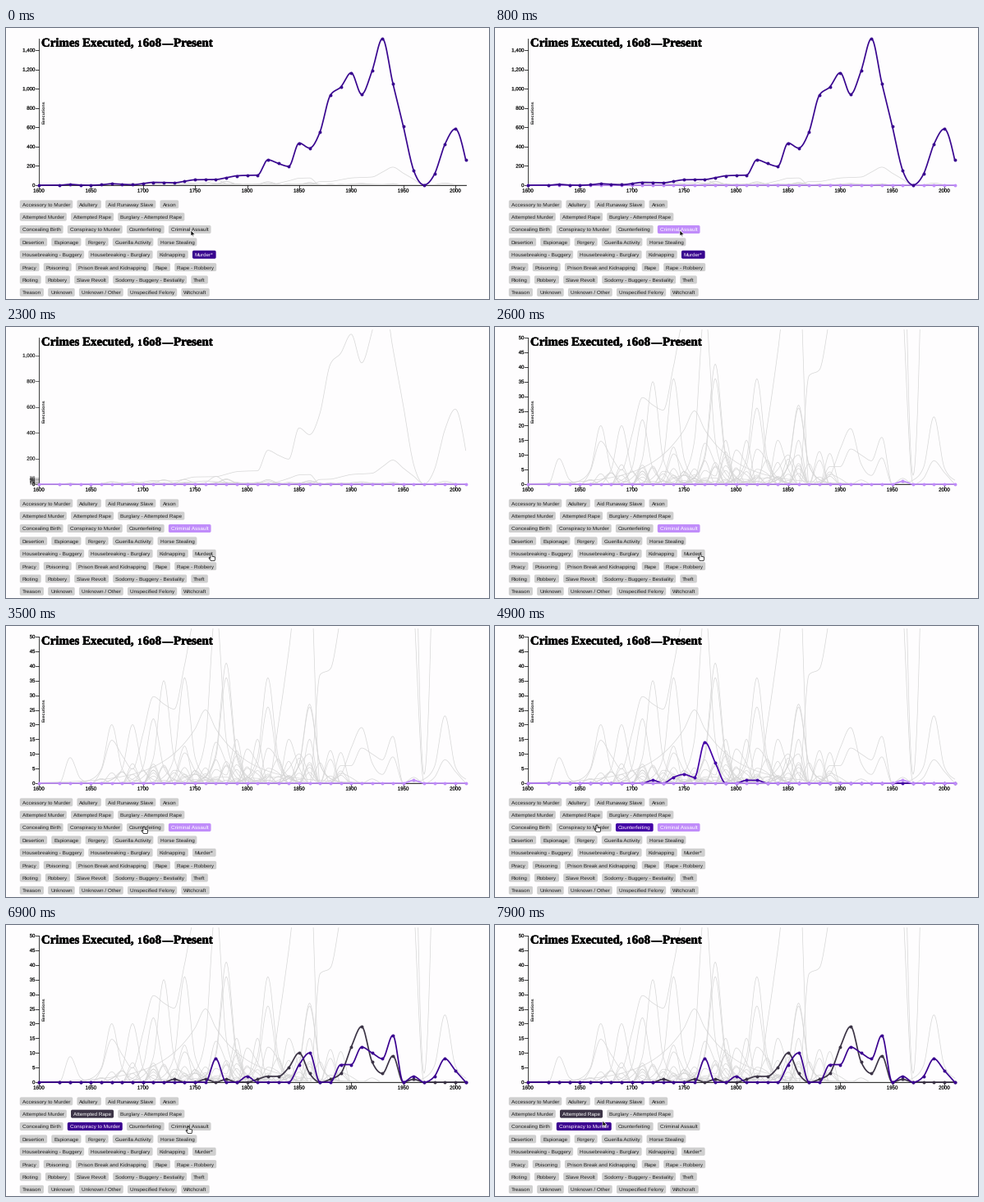
These frames come from a looping animation (588x331 px, 8000 ms). A matplotlib script:

```python
import numpy as np
import matplotlib.pyplot as plt
from matplotlib.animation import FuncAnimation
from matplotlib.patches import FancyBboxPatch, Polygon, Rectangle
from matplotlib.patheffects import withStroke

W, H, DPI = 588, 331, 64
FRAMES, STEP = 80, 100
X0, X1, TOP, BASE = 39.5, 559.7, 13, 192
PX_YEAR = 1.2675
BIG, SMALL = 1519, 50
GREY, INK, FILL = "#d6d6d6", "#1c1c1c", "#cfcfcf"

plt.rcParams["text.hinting"] = "none"
plt.rcParams["font.family"] = "Liberation Sans"


def pt(px):
    return px * 72 / DPI


fig = plt.figure(figsize=(W / DPI, H / DPI), dpi=DPI, facecolor="#fefdfe")
ax = fig.add_axes([0, 0, 1, 1])
ax.set_xlim(0, W)
ax.set_ylim(H, 0)
ax.axis("off")
clip = Rectangle((0, 3), W, H, transform=ax.transData)


def label(x, y, s, size, ha="center", heavy=0, color=INK, **kw):
    """Text on a baseline, thickened by a stroke of heavy pixels."""
    if heavy:
        kw["path_effects"] = [withStroke(linewidth=pt(heavy),
                                         foreground=color)]
    kw.setdefault("va", "baseline")
    return ax.text(x, y, s, fontsize=pt(size), ha=ha, color=color, **kw)


def rule(xs, ys):
    return ax.plot(xs, ys, color="#111111", lw=pt(0.8), zorder=3)[0]


def year_x(year):
    return 40 + (year - 1600) * PX_YEAR


# ---- data -------------------------------------------------------------

YEARS = np.array([1600] + list(range(1620, 2011, 10)))
KNOT_X = year_x(YEARS)
rng = np.random.default_rng(7)


def run(start, *values):
    """Values decade by decade from start, zero elsewhere."""
    ends = [start - 10, *range(start, start + 10 * len(values) + 1, 10)]
    return np.interp(YEARS, ends, [0, *values, 0])


def bump(year, height, fall=1.4):
    return height * np.exp(-fall * abs(YEARS - year) / 10)


def murder():
    early = 102 * ((YEARS - 1600) / 200) ** 2.6
    early += 8 * np.sin(2 * np.pi * (YEARS - 1620) / 40)
    late = run(1820, 263, 225, 195, 437, 385, 552, 933, 1018, 1165, 942,
               1184, 1519, 1056, 612, 153, 3, 115, 424, 583, 262)
    return np.where(YEARS < 1820, np.clip(early, 0, 104), late)


def minor():
    """A rare offence: a few low bumps, densest around 1790."""
    y = np.zeros(len(YEARS))
    for year in rng.normal(1795, 65, rng.integers(4, 8)):
        y[np.argmin(abs(YEARS - year))] = min(1 + rng.exponential(3.8), 15)
    return y


def monotone(x, y, n=12):
    """Monotone cubic curve through the points."""
    h = np.diff(x)
    s = np.diff(y) / h
    p = (s[:-1] * h[1:] + s[1:] * h[:-1]) / (h[:-1] + h[1:])
    m = np.zeros_like(y)
    m[1:-1] = (np.sign(s[:-1]) + np.sign(s[1:])) * np.minimum(
        np.minimum(abs(s[:-1]), abs(s[1:])), 0.5 * abs(p))
    m[0] = (3 * s[0] - m[1]) / 2
    m[-1] = (3 * s[-1] - m[-2]) / 2
    u = np.linspace(0, 1, n, endpoint=False)
    a, b = y[:-1, None], y[1:, None]
    ma, mb = (m[:-1] * h)[:, None], (m[1:] * h)[:, None]
    cy = ((2 * u**3 - 3 * u**2 + 1) * a + (u**3 - 2 * u**2 + u) * ma
          + (3 * u**2 - 2 * u**3) * b + (u**3 - u**2) * mb)
    cx = x[:-1, None] + u * h[:, None]
    return np.append(cx, x[-1]), np.append(cy, y[-1])


class Curve:
    def __init__(self, values, color=GREY, order=0):
        self.values, self.color, self.order = values, color, order
        self.x, self.y = monotone(KNOT_X, values)
        self.line, = ax.plot([], [])
        self.line.set_clip_path(clip)
        self.dots, = ax.plot([], [], "o", color=color, ms=pt(3.9), mew=0,
                             zorder=4.5 + order)

    def draw(self, to_y, on=False):
        self.line.set_data(self.x, to_y(self.y))
        self.line.set(color=self.color if on else GREY,
                      linewidth=pt(1.7 if on else 0.7),
                      zorder=4 + self.order if on else 2)
        self.dots.set_data(KNOT_X, to_y(self.values))
        self.dots.set_visible(on)


# in drawing order
curves = {
    "Attempted Rape": Curve(
        run(1810, 1, 2, 2, 5, 10, 3, 0, 1, 3, 12, 19, 7, 3, 9, 0, 1)
        + np.isin(YEARS, [1730, 1760, 1780]), "#3c3446", 0),
    "Conspiracy to Murder": Curve(
        run(1770, 8, 0, 0, 2) + run(1850, 6, 10)
        + run(1890, 6, 6, 12, 10, 8, 16, 0, 2, 0, 2, 8, 4), "#3a0090", 1),
    "Counterfeiting": Curve(
        run(1720, 1, 0, 2, 3, 2, 14, 7) + run(1810, 1, 1), "#4300a6", 2),
    "Criminal Assault": Curve(run(1960, 1), "#c08cfa", 3),
    "Murder*": Curve(murder(), "#38058f", 4),
}

PEAKS = [(1670, 20), (1690, 20), (1710, 22), (1720, 35), (1740, 36),
         (1770, 60), (1780, 41), (1780, 36), (1820, 36), (1820, 26),
         (1860, 27), (1860, 26), (1990, 23)]
backdrop = [Curve(bump(*p)) for p in PEAKS]
backdrop += [
    Curve(bump(1760, 25, 0.3)),
    Curve(run(1830, 20, 45, 72, 75)),
    Curve(np.interp(YEARS, [1860, 1870, 1880, 1900, 1920, 1940, 1970],
                    [0, 37, 39, 75, 85, 187, 0])),
]
backdrop += [Curve(minor()) for _ in range(20)]

# ---- axes and title -----------------------------------------------------

rule([X0, X0], [TOP, BASE])
rule([X0, X1], [BASE, BASE])
for year in range(1600, 2001, 50):
    x = year_x(year)
    rule([x, x], [BASE, BASE + 4])
    label(x, 200.6, str(year), 6.1, heavy=0.15)
label(46.2, 102.5, "Executions", 5.4, rotation=90, weight="bold",
      va="center")


class Tick:
    def __init__(self, value, top):
        self.value, self.top = value, top
        self.mark = rule([], [])
        self.text = label(35.5, 0, f"{value:,}", 6.1, "right", heavy=0.15)

    def draw(self, to_y, top):
        y = to_y(self.value)
        blend = (top - SMALL) / (BIG - SMALL)
        alpha = blend if self.top == BIG else 1 - blend
        self.mark.set_data([X0 - 4, X0], [y, y])
        self.text.set_y(y + 2.1)
        for part in (self.mark, self.text):
            part.set(visible=y > TOP - 1 and alpha > 0.01, alpha=alpha)


ticks = ([Tick(v, BIG) for v in range(0, 1401, 200)]
         + [Tick(v, SMALL) for v in range(0, 51, 5)])


def heading(x, s, size=14.9, ha="left"):
    label(x, 22.6, s, size, ha, heavy=0.6, color="black",
          family="Liberation Serif", weight="bold", zorder=12)


# old-style figures: low 1 and 0
heading(43, "Crimes Executed,")
heading(163, "1", 11, "center")
heading(166.7, "6")
heading(174.2, "o")
heading(181.6, "8")
heading(196.6, "—", 12.5, "center")
heading(204, "Present")

# ---- buttons --------------------------------------------------------------

ROWS = """\
Accessory to Murder, Adultery, Aid Runaway Slave, Arson
Attempted Murder, Attempted Rape, Burglary - Attempted Rape
Concealing Birth, Conspiracy to Murder, Counterfeiting, Criminal Assault
Desertion, Espionage, Forgery, Guerilla Activity, Horse Stealing
Housebreaking - Buggery, Housebreaking - Burglary, Kidnapping, Murder*
Piracy, Poisoning, Prison Break and Kidnapping, Rape, Rape - Robbery
Rioting, Robbery, Slave Revolt, Sodomy - Buggery - Bestiality, Theft
Treason, Unknown, Unknown / Other, Unspecified Felony, Witchcraft"""
PAD, GAP = 3, 5.2

buttons = {}
for r, row in enumerate(ROWS.splitlines()):
    x, y = 16.8, 215.3 + 15.36 * r
    for name in row.split(", "):
        text = label(x + PAD, y + 2.2, name, 6.4, "left", zorder=11)
        width = text.get_window_extent().width + 2 * PAD
        box = FancyBboxPatch((x, y - 5), width, 10, ec="none", zorder=10,
                             boxstyle="round,pad=0,rounding_size=1.8",
                             snap=False)
        ax.add_patch(box)
        buttons[name] = box, text
        x += width + GAP

# ---- pointer and timeline -------------------------------------------------

ARROW = 0.85 * np.array([(0, 0), (0, 8.5), (2, 6.7), (3.3, 9.6), (4.6, 9),
                         (3.3, 6.2), (6, 6.2)])
HAND = np.array([(-1, 1), (-.4, 0), (.5, 0), (1, 1), (1, 3.2), (4.4, 4),
                 (4.8, 5), (4, 8.5), (-.5, 8.5), (-3, 5.2), (-2.4, 4.5),
                 (-1, 5.5)])
pointer = Polygon(ARROW, closed=True, lw=pt(0.7), zorder=20)
ax.add_patch(pointer)

# time, pointer place, button toggled there
STOPS = [
    (0, (225, 247), None),
    (600, (225, 247), "Criminal Assault"),
    (1400, (196, 241.5), None),
    (2200, (250, 277), "Murder*"),
    (3800, (168, 245), "Counterfeiting"),
    (5000, (124, 243), "Conspiracy to Murder"),
    (5400, (104, 230), "Attempted Rape"),
    (6100, (175, 247), "Counterfeiting"),
    (6800, (222, 246), "Criminal Assault"),
    (7900, (131, 239), None),
]
RESCALE = (2200, 2500)


def ease(t, start, end):
    u = np.clip((t - start) / (end - start), 0, 1)
    return u * u * (3 - 2 * u)


def pointer_at(t):
    """Rest after each stop, then glide and settle before the next."""
    for (t0, a, _), (t1, b, _) in zip(STOPS, STOPS[1:]):
        if t <= t1:
            gap = t1 - t0
            k = ease(t, t0 + 0.3 * gap, t0 + 0.75 * gap)
            return np.array(a) * (1 - k) + np.array(b) * k


def selected(t):
    chosen = {"Murder*"}
    for when, _, name in STOPS:
        if name and when <= t:
            chosen ^= {name}
    return chosen


def draw(frame):
    t = frame * STEP
    top = BIG + (SMALL - BIG) * ease(t, *RESCALE)
    chosen = selected(t)

    def to_y(v):
        return BASE - np.asarray(v) * (BASE - TOP) / top

    for tick in ticks:
        tick.draw(to_y, top)
    for curve in backdrop:
        curve.draw(to_y)
    for name, curve in curves.items():
        curve.draw(to_y, name in chosen)
    for name, (box, text) in buttons.items():
        on = name in chosen
        box.set_facecolor(curves[name].color if on else FILL)
        text.set_color("white" if on else INK)

    hand = 1900 <= t < 7300
    pointer.set_xy((HAND if hand else ARROW) + pointer_at(t))
    pointer.set_facecolor("white" if hand else "black")
    pointer.set_edgecolor("black" if hand else "white")
    return []


anim = FuncAnimation(fig, draw, frames=FRAMES, interval=STEP,
                     init_func=lambda: draw(0), repeat=True, repeat_delay=0,
                     blit=False)
plt.show()
```
